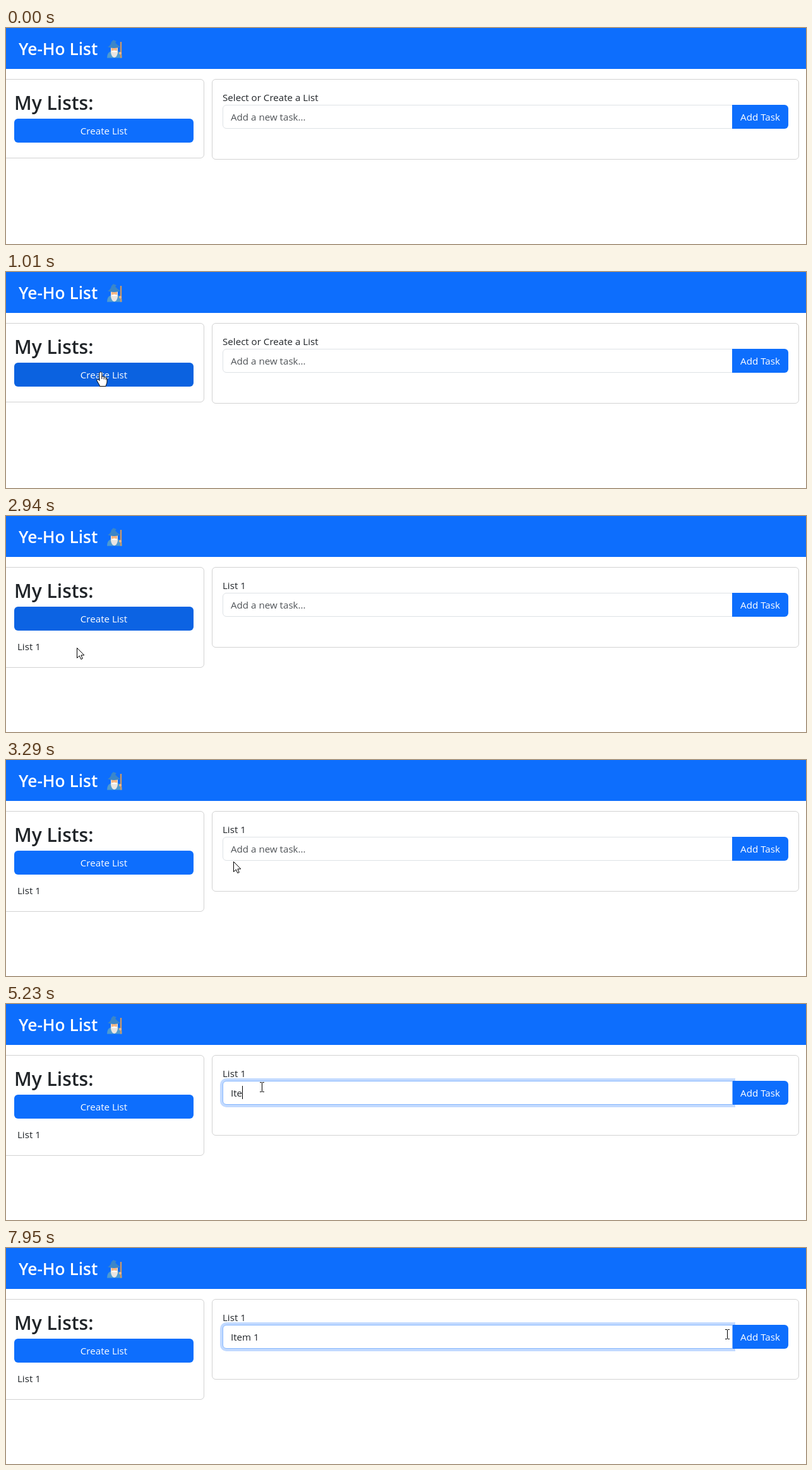
Write an HTML page that moves like this. It is 1267 px wide and 343 px high and loops after 8000 ms.

```html
<!DOCTYPE html>
<html lang="en">
<head>
<meta charset="utf-8">
<title>Ye-Ho List</title>
<style>
html, body { margin: 0; width: 100%; height: 100%; overflow: hidden; background: #fff; }
svg { display: block; }
text { font: 15.15px "Open Sans", "Noto Sans", sans-serif; fill: #212529; white-space: pre; }
.light { fill: #fff; }
.hint { fill: #505458; }
.title { font-size: 26.3px; font-weight: 600; }
.head { font-size: 30px; font-weight: 600; }
.card { fill: #fff; stroke: rgba(0, 0, 0, .175); }
</style>
</head>
<body>
<svg width="1267" height="343" viewBox="0 0 1267 343">
  <rect width="1267" height="65" fill="#0d6efd"/>
  <text class="title light" x="20" y="43">Ye-Ho List</text>

  <g id="wizard">
    <path d="M160 47.5Q160 38 167 37H177Q184 38 184 47.5Z" fill="#4f9bd0"/>
    <path d="M166 31H177V39Q176 46 171.500 47Q167 46 166 39Z" fill="#e9e6e2"/>
    <path d="M167 30H176V36H167Z" fill="#f5b784"/>
    <path d="M167 37Q171.500 34 176 37Q174 39 171.500 38Q169 39 167 37Z" fill="#fff"/>
    <path d="M161 30Q166 28 167 22L170 19L175 21L173 23Q176 27 181 30Q171 34 161 30Z" fill="#3b86c8"/>
    <path d="M182 22V47.5" stroke="#c99767" stroke-width="2.4"/>
    <circle cx="181" cy="40" r="2" fill="#f5b784"/>
  </g>

  <rect id="side" class="card" x="-10.5" y="81.5" width="324" rx="5.5"/>
  <text class="head" x="13" y="130">My Lists:</text>
  <rect id="create" x="13" y="144" width="284" height="38" rx="6"/>
  <text class="light" x="155" y="169" text-anchor="middle">Create List</text>
  <text id="entry" x="18" y="213">List 1</text>

  <rect class="card" x="326.5" y="81.5" width="929" height="127" rx="5.5"/>
  <text id="name" x="343" y="116"></text>
  <path id="ring" d="M349 118H1155V164H349A10 10 0 0 1 339 154V128A10 10 0 0 1 349 118Z" fill="#0d6efd"/>
  <path id="field" d="M349 122.5H1150.5V159.5H349A5.5 5.5 0 0 1 343.5 154V128A5.5 5.5 0 0 1 349 122.5Z" fill="#fff"/>
  <path d="M1151 122H1233A6 6 0 0 1 1239 128V154A6 6 0 0 1 1233 160H1151Z" fill="#0d6efd"/>
  <rect id="seam" x="1150" y="122" width="1" height="38"/>
  <text class="light" x="1194.5" y="147" text-anchor="middle">Add Task</text>
  <text id="task" x="356" y="147"></text>
  <rect id="caret" y="130" width="1" height="21"/>

  <path id="arrow" d="M.5 .5V16.5L4.300 13L6.800 18.5L9.300 17.4L6.900 12H11.800Z" fill="#fff" stroke="#000"/>
  <g id="hand" stroke="#000">
    <path d="M-2 1.500C-2 -.7 1.800 -.7 1.800 1.500V7.200C3 6 5 6.500 5.200 8.200C6.300 7.200 8 7.800 8.200 9.300C9.300 8.800 10 9.800 10 11V15.500C10 18 8.500 19.500 8 22.500H-1.500C-2 19.500 -4.500 17 -6 13.500C-6.500 12 -4.500 10.500 -3.200 12L-2 13.500Z" fill="#fff" stroke-linejoin="round"/>
    <path d="M1.800 7V11M5.200 8.500V11.500M8.200 9.500V12" fill="none"/>
  </g>
  <path id="beam" d="M-3 -7.500H0M1 -7.500H4M-3 7.500H0M1 7.500H4M.5 -7V7" stroke="#000" fill="none"/>
</svg>
<script>
const LOOP = 8000, STEP = 70, FADE = 150, BLINK = 530;
const HOVER = 935, PRESS = 1730, LISTED = 1880, LEAVE = 2915, FOCUS = 3745;
const WORD = 'Item 1', KEYS = [4770, 5100, 5230, 5500, 5630, 6290];
const BLUE = [13, 110, 253], DARK = [11, 94, 215], DEEP = [10, 88, 202];
const GREY = [222, 226, 230], SKY = [134, 183, 254];

// Pointer strokes: quadratic curves from the end of the one before
const start = [488, 313];
const moves = [
  { from: 590, to: 1010, via: [319, 236], end: [150, 159] },
  { from: 2660, to: 2940, via: [150, 175], end: [112, 209] },
  { from: 2940, to: 3430, via: [300, 215], end: [405, 132] },
  { from: 6820, to: 7590, via: [720, 150], end: [1038, 143] },
  { from: 7590, to: 7940, via: [1100, 132], end: [1142, 137] }
];

const $ = id => document.getElementById(id);
const set = (id, name, value) => $(id).setAttribute(name, value);
const show = (id, on) => set(id, 'visibility', on ? 'visible' : 'hidden');
const part = (t, from, to) => Math.min(1, Math.max(0, (t - from) / (to - from)));
const smooth = k => k * k * (3 - 2 * k);
const fade = (t, from) => 1 - (1 - part(t, from, from + FADE)) ** 2;
const blend = (a, b, k) => a.map((v, i) => v + (b[i] - v) * k);
const rgb = c => `rgb(${c.map(Math.round)})`;

function buttonColor(t) {
  let c = blend(BLUE, DARK, fade(t, HOVER));
  c = blend(c, DEEP, fade(t, PRESS) - fade(t, LISTED));
  return rgb(blend(c, BLUE, fade(t, LEAVE)));
}

function pointerAt(t) {
  const i = moves.findLastIndex(m => m.from <= t);
  if (i < 0) return null;
  const m = moves[i], a = i ? moves[i - 1].end : start;
  const tick = t - (t - m.from) % STEP;
  const k = smooth(part(tick, m.from, m.to));
  return blend(blend(a, m.via, k), blend(m.via, m.end, k), k).map(Math.round);
}

function pointerKind([x, y]) {
  if (x > 13 && x < 297 && y > 144 && y < 182) return 'hand';
  if (x > 343 && x < 1150 && y > 122 && y < 160) return 'beam';
  return 'arrow';
}

function draw(t) {
  const listed = t >= LISTED;
  set('side', 'height', listed ? 159 : 125);
  show('entry', listed);
  $('name').textContent = listed ? 'List 1' : 'Select or Create a List';
  set('create', 'fill', buttonColor(t));

  const glow = fade(t, FOCUS);
  const edge = rgb(blend(GREY, SKY, glow));
  set('ring', 'opacity', .25 * glow);
  set('field', 'stroke', edge);
  set('seam', 'fill', glow ? edge : rgb(BLUE));

  const pressed = KEYS.filter(k => k <= t);
  const text = WORD.slice(0, pressed.length);
  $('task').textContent = text || 'Add a new task...';
  set('task', 'class', text ? '' : 'hint');
  const width = text ? $('task').getComputedTextLength() : 0;
  set('caret', 'x', Math.floor(356 + width));
  const idle = t - (pressed.at(-1) ?? FOCUS);
  show('caret', idle >= 0 && Math.floor(idle / BLINK) % 2 === 0);

  const spot = pointerAt(t);
  const kind = spot && pointerKind(spot);
  for (const id of ['arrow', 'hand', 'beam']) show(id, id === kind);
  if (spot) set(kind, 'transform', `translate(${spot})`);
}

const begin = performance.now();
function frame() {
  draw((performance.now() - begin) % LOOP);
  requestAnimationFrame(frame);
}
frame();
</script>
</body>
</html>
```
